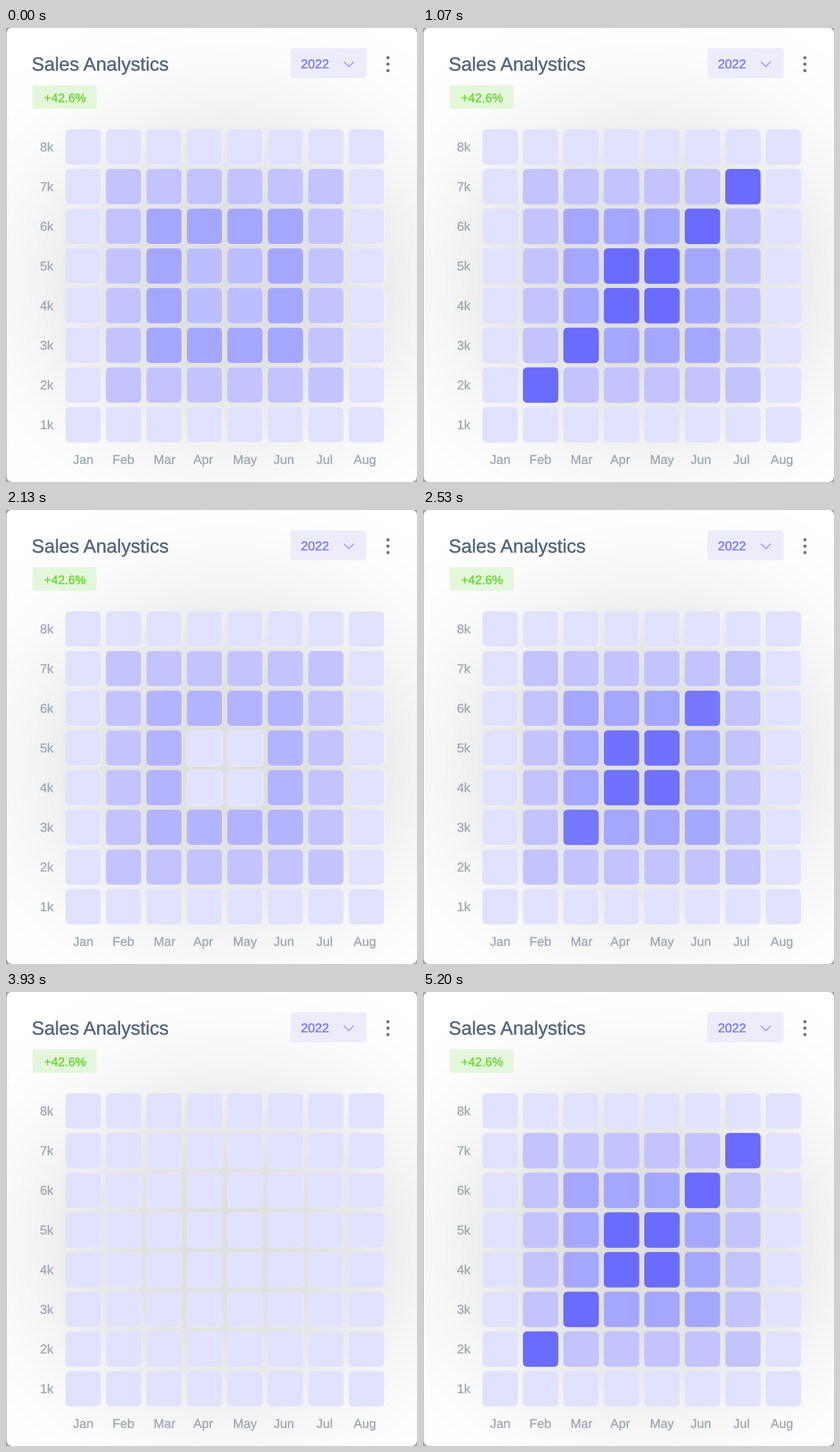
A matplotlib script for the animation above (5.8 s loop, 713 by 786 pixels).

```python
import numpy as np
import matplotlib.pyplot as plt
from matplotlib.animation import FuncAnimation
from matplotlib.collections import PatchCollection
from matplotlib.patches import Circle, FancyBboxPatch
from matplotlib.patheffects import Normal, Stroke

W, H, DPI = 713, 786, 64
PT = 72 / DPI                 # points per pixel
LOOP, INTERVAL = 5800, 40
TICK = 200 / 3                # the picture advances at 15 steps per second
CYCLE, PHASE = 34, 9          # steps per cycle, step at which the loop begins
START, STAGE = 147, 200       # fill delay and stage length in ms

ACCENT = np.array([0x69, 0x6C, 0xFF]) / 255
INK, MUTED = "#566a7f", "#a3aeba"
X0, Y0, DX, DY, CELL = 103.1, 175.3, 70.2, 68.7, 61.4
MONTHS = {"Jan": 134, "Feb": 203.5, "Mar": 275, "Apr": 342,
          "May": 414.5, "Jun": 482, "Jul": 552.5, "Aug": 622.5}

fig = plt.figure(figsize=(W / DPI, H / DPI), dpi=DPI, facecolor="#a2a2a2")
ax = fig.add_axes([0, 0, 1, 1])
ax.axis("off")


def rounded(x, y, w, h, r, **style):
    return FancyBboxPatch((x, y), w, h, lw=0,
                          boxstyle=f"round,pad=0,rounding_size={r}", **style)


def label(x, y, text, size, color, ha="left", weight=0.4):
    ax.text(x, y, text, fontsize=size * PT, color=color, ha=ha, va="baseline",
            family="Liberation Sans",
            path_effects=[Stroke(linewidth=weight * PT, foreground=color),
                          Normal()])


def draw_card():
    yy, xx = np.mgrid[0:H, 0:W] + 0.5
    dist = np.hypot((xx - 385) / 335, (yy - 435) / 300)
    shade = 255 - 32 * np.exp(-dist ** 3)
    pixels = np.repeat(shade.round().astype(np.uint8)[:, :, None], 3, axis=2)
    card = ax.add_patch(rounded(1, -0.5, W - 1, H + 0.5, 12, fc="white"))
    image = ax.imshow(pixels, extent=(0, W, H, 0), aspect="auto",
                      interpolation="nearest", zorder=1.5)
    image.set_clip_path(card)
    ax.set_xlim(0, W)
    ax.set_ylim(H, 0)


def draw_header():
    label(44.5, 73.8, "Sales Analystics", 32.9, INK)
    ax.add_patch(rounded(46, 99, 111, 41, 4, fc="#e4f7dc", zorder=2))
    label(66, 128.3, "+42.6%", 21.3, "#6cdb34")
    ax.add_patch(rounded(493.5, 35, 132, 52, 5, fc="#edecfb", zorder=2))
    label(511.5, 69.8, "2022", 22, "#797cff")
    ax.plot([586.5, 594.8, 603], [58.6, 67, 58.6], color="#7d80fb",
            lw=1.4 * PT, solid_capstyle="round", solid_joinstyle="round")
    for y in (51.5, 62.6, 73.7):
        ax.add_patch(Circle((662.5, y), 2.8, fc="#697a8d", lw=0, zorder=3))


def draw_labels():
    for month, x in MONTHS.items():
        label(x, 754.6, month, 22, MUTED, ha="center")
    for i in range(8):
        label(59, 213.5 + DY * i, f"{8 - i}k", 22, MUTED)


def cell_grid(grow=0, shift=0):
    size = CELL + 2 * grow
    boxes = [rounded(X0 + DX * j - grow + shift, Y0 + DY * i - grow + shift,
                     size, size, 8 + grow)
             for i in range(8) for j in range(8)]
    return ax.add_collection(PatchCollection(boxes, linewidths=0))


draw_card()
draw_header()
draw_labels()
rims = cell_grid(grow=0.5, shift=0.4)
rims.set(facecolor="white", zorder=3)
cells = cell_grid()
cells.set_zorder(4)

row, col = np.mgrid[0:8, 0:8]
ring = np.minimum(np.minimum(row, 7 - row), np.minimum(col, 7 - col))
hot = (ring == 3) | ((row + col == 7) & (ring > 0))
hot_stage = np.where(ring == 1, 4, 3)


def ease_out(x):
    return 1 - (1 - np.clip(x, 0, 1)) ** 1.67


def levels(ms):
    """Strength of the accent per cell: rings fill inwards, then the diagonal."""
    clock = (ms - START) / STAGE
    level = 0.2 + 0.2 * ring * ease_out(clock - (ring - 1))
    return level + hot * (1 - level) * ease_out(clock - hot_stage)


def update(i):
    tick = int((i * INTERVAL + 35) / TICK)
    step = (tick + PHASE) % CYCLE
    level = levels(step * TICK).reshape(-1, 1)
    cells.set_facecolor(1 - level * (1 - ACCENT))
    rims.set_alpha(0.3 if step < 2 else 0.8 if step < 19 else 0)
    return cells, rims


anim = FuncAnimation(fig, update, frames=LOOP // INTERVAL, interval=INTERVAL,
                     repeat=True, repeat_delay=0, blit=False)
plt.show()
```
